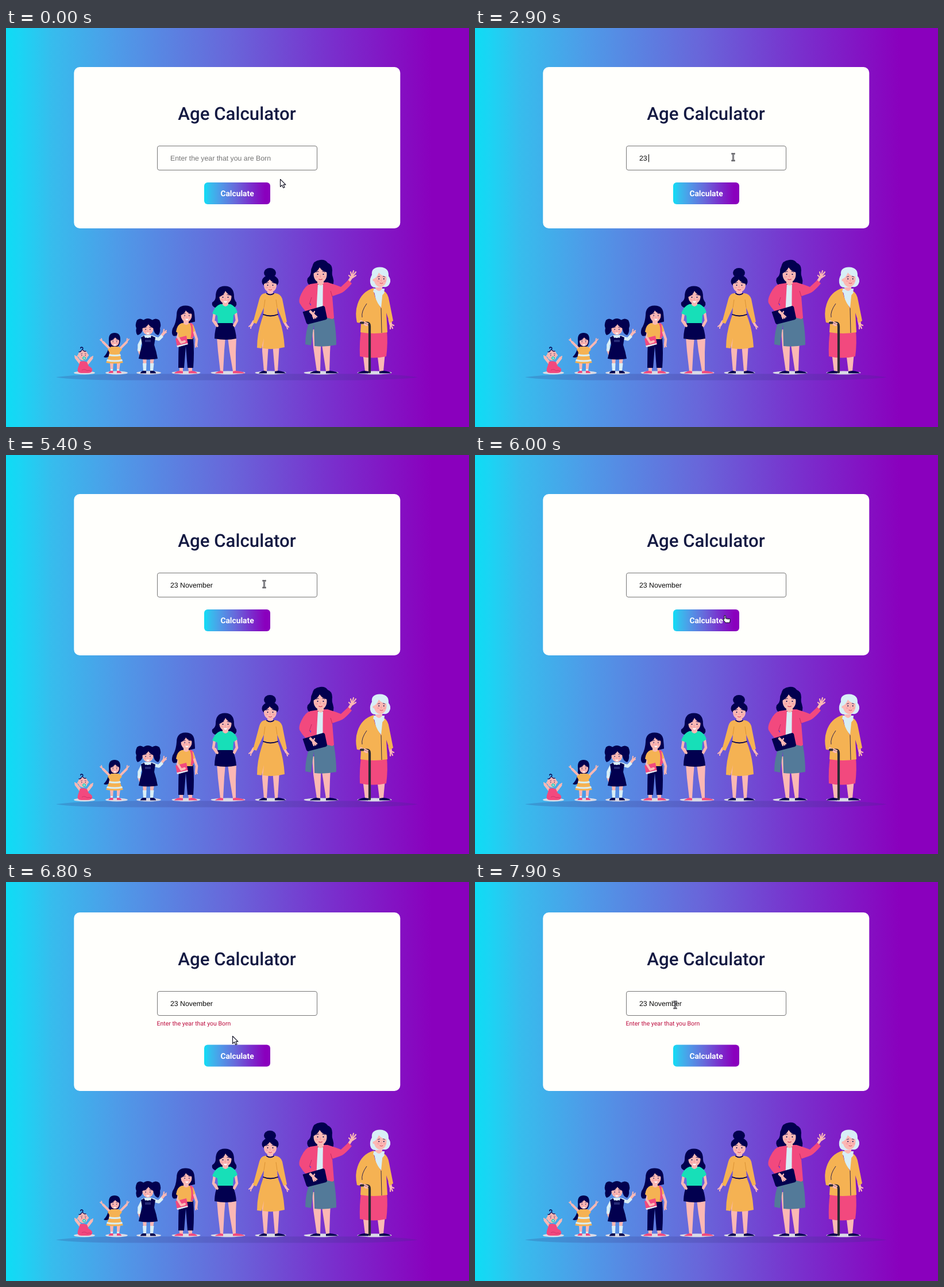
Recreate the animation shown at these times as an HTML page. Size 806 by 695 pixels, loop 8 s.

```html
<!DOCTYPE html>
<html lang="en">
<head>
<meta charset="utf-8">
<title>Age Calculator</title>
<style>
  html, body { margin: 0; width: 100%; height: 100%; overflow: hidden; }
  svg { display: block; width: 806px; height: 695px; }
  text { white-space: pre; text-rendering: geometricPrecision; }
  .ui { font-family: Roboto, sans-serif; }
  .field { font: 12.3px "Liberation Sans", Arial, sans-serif; }
  .navy { fill: #02004f; }
  .skin { fill: #fbb8b4; }
  .yellow { fill: #f5b253; }
  .pink { fill: #f2497e; }
  .pale { fill: #d8eef6; }
  .line { fill: none; stroke: #02004f; stroke-linecap: round; stroke-linejoin: round; }
  .limb { fill: none; stroke: #fbb8b4; stroke-linecap: round; stroke-linejoin: round; }
  .pad { fill: #dadbe6; }
</style>
</head>
<body>
<svg viewBox="0 0 806 695">
  <defs>
    <linearGradient id="sweep">
      <stop offset="0" stop-color="#0edcf4"/>
      <stop offset=".03" stop-color="#1ad5f4"/>
      <stop offset=".1" stop-color="#37bced"/>
      <stop offset=".24" stop-color="#4e9be8"/>
      <stop offset=".48" stop-color="#6867da"/>
      <stop offset=".7" stop-color="#7930cd"/>
      <stop offset=".92" stop-color="#8a00bd"/>
    </linearGradient>
    <g id="face">
      <ellipse cx="-6" cy="4" rx="2.3" ry="1.6" fill="#f5808f" opacity=".35"/>
      <ellipse cx="6" cy="4" rx="2.3" ry="1.6" fill="#f5808f" opacity=".35"/>
      <path class="line" stroke-width=".8" d="M-6.5-3.5q2-1.5 3.5-1M3-4.5q2-.5 3.500 1"/>
      <circle class="navy" cx="-4.5" r="1"/>
      <circle class="navy" cx="4.5" r="1"/>
      <path d="M0 1l-1 3h2" fill="none" stroke="#ee8f96" stroke-width=".8"/>
    </g>
    <g id="grin">
      <use href="#face"/>
      <path d="M-4 6q4 1 8 0q-1 4-4 4t-4-4z" fill="#fff" stroke="#e0798a" stroke-width=".4"/>
    </g>
    <g id="smile">
      <use href="#face"/>
      <path d="M-3 7.5q3 2 6 0" fill="none" stroke="#d8405e"/>
    </g>
  </defs>

  <rect width="806" height="695" fill="url(#sweep)"/>

  <g id="people">
    <path d="M87 608.5q30-5 110-6h410q80 .5 110 6q-30 4-110 5h-410q-80-.5-110-5z" fill="#35337f" opacity=".22"/>

    <!-- baby -->
    <g>
      <ellipse class="pad" cx="136.500" cy="600.500" rx="18.500" ry="3"/>
      <path class="limb" stroke-width="5" d="M122 574l7 9M149 575l-7 9"/>
      <path class="limb" stroke-width="2" d="M120 571l2 4M151 572l-2 4"/>
      <path class="pink" d="M129 581q7-2 12 1l3 7q7 3 6 8q-1 4-8 4h-11q-8 0-6-8z"/>
      <path d="M132 596q5-3 9 1q4-2 8 1" fill="none" stroke="#c92f66" stroke-width=".8"/>
      <ellipse class="skin" cx="134" cy="570" rx="8.500" ry="9"/>
      <circle class="skin" cx="126" cy="571" r="2"/>
      <circle class="skin" cx="142" cy="570" r="2"/>
      <path class="line" stroke-width="1.300" d="M132 561q4-4 0-5q-3 0-2 2M127 564q3 1 4-2M134 561q2 3 5 2"/>
      <use href="#face" transform="translate(135 570) scale(.7)"/>
      <circle cx="136" cy="575" r="2.800" fill="#19cdb9"/>
      <circle class="pale" cx="136" cy="575" r="1.200"/>
    </g>

    <!-- toddler -->
    <g>
      <ellipse class="pad" cx="192.500" cy="600.500" rx="19.500" ry="3"/>
      <path class="navy" d="M179 542q0-11 10-11t10 11q0 7-3 12l-8 3q-3 12-10 16q-5 2-8 0q6-6 8-14q2-9 1-17z"/>
      <path class="limb" stroke-width="4" d="M182 560l-13-13M197 560l13-13"/>
      <path class="limb" stroke-width="1.800" d="M169 547l-5-4M168 547l-2-6M210 547l4-5M210 547l1-6"/>
      <path class="skin" d="M181 582h6l-1 16h-4zM193 582h6l-2 16h-4z"/>
      <path class="yellow" d="M177 560l6-5h13l6 5-4 5q1 10 6 18q-15 3-30 0q5-9 6-18z"/>
      <path class="pale" d="M180 568q10 2 19 0l1 3q-11 2-21 0zM176 577q14 3 26 0l1 3q-14 3-28 0z"/>
      <ellipse class="skin" cx="189.500" cy="546" rx="7.500" ry="8.500"/>
      <path class="navy" d="M181 545q0-13 8-13t9 12q-5-1-8-5q-3 4-9 6z"/>
      <use href="#grin" transform="translate(189.500 546.500) scale(.7)"/>
      <path class="pale" d="M182 594h4v4h-4zM193 594h4v4h-4z"/>
      <path class="pink" d="M182 597h4.500v4h-8q0-2 3.500-4zM193 597h4q4 2 4 4h-8z"/>
    </g>

    <!-- schoolgirl -->
    <g>
      <ellipse class="pad" cx="248.500" cy="600.500" rx="21.500" ry="3"/>
      <path class="navy" d="M240 509q-7-5-12 0q-4 8-1 14q-2 7 2 12q6-1 9-9q3-8 2-17zM254 509q7-5 13 0q4 8 1 14q1 7-3 12q-6-1-8-9q-4-8-3-17z"/>
      <ellipse class="navy" cx="247" cy="518" rx="12" ry="12"/>
      <path class="limb" stroke-width="4.500" d="M231 560l4 11M271 536l4-5"/>
      <path class="limb" stroke-width="2" d="M274 532l5-5M274 531l1-6M275 532l4-2"/>
      <path d="M238 540l-6 12 0 11M258 540l8 2 6-6" fill="none" stroke="#d8eef6" stroke-width="5.500" stroke-linejoin="round"/>
      <path class="skin" d="M238 574h7l-1 13h-5zM251 574h7l-2 13h-5z"/>
      <path class="pale" d="M238 584h6.500l-.5 14h-5zM251 584h6.500l-1.500 14h-5z"/>
      <path class="pale" d="M236 537q11-5 24 0l-3 9h-18z"/>
      <path class="navy" d="M235 539l5-3q7 8 13 0l7 3-2 13q4 12 6 24q-16 3-33 0q2-12 6-24z"/>
      <path d="M242 543h10v4h-10z" fill="#262b78"/>
      <path class="pale" d="M241 535l6 3 6-3-1 5-5-2-5 2z"/>
      <ellipse class="skin" cx="247" cy="524.500" rx="9.500" ry="10"/>
      <path class="navy" d="M237 523q-1-16 10-16t10 16q-6-2-9-7q-4 6-11 7z"/>
      <use href="#grin" transform="translate(247 525) scale(.85)"/>
      <path class="navy" d="M239 597h5v4.500h-10q0-3 5-4.500zM251 597h5q5 1 5 4.500h-10z"/>
    </g>

    <!-- pupil with book -->
    <g>
      <ellipse class="pad" cx="313.500" cy="600.500" rx="25" ry="3"/>
      <path class="navy" d="M297 500q0-16 15-16.500t16 14q1 9 1 14l-16 4q-6 5-9 13q-3 9-12 8q-5-3-2-13q6-9 7-23.500z"/>
      <path class="pink" d="M320 514q6 0 7 5v18q-3 3-6 1z"/>
      <path class="limb" stroke-width="4.500" d="M326 524l6 18-1 10M301 530l-2 9"/>
      <path class="limb" stroke-width="2" d="M331 551l2 4M330 551l0 5"/>
      <path class="skin" d="M302 590h6v9h-6zM317 590h7v9h-6z"/>
      <path class="navy" d="M301 540h25q2 25 0 52h-10l-3-38-3 38h-10q0-26 1-52z"/>
      <path class="yellow" d="M306 514h14q8 2 9 14l-4 2v12h-25v-10l-4-3q2-13 10-15z"/>
      <path class="skin" d="M309 508h9v7q-4 4-9 0z"/>
      <path d="M321 514q5 7 2 27" fill="none" stroke="#f2497e" stroke-width="3"/>
      <path class="pink" d="M295 541l19-5 3 15-19 5z"/>
      <path class="pale" d="M297 553.500l19-4.500.5 2-18 5z"/>
      <path class="limb" stroke-width="4" d="M300 540l5 8 6-2"/>
      <ellipse class="skin" cx="314" cy="501" rx="9.500" ry="11"/>
      <path class="navy" d="M303 501q-1-16 10-16t11 13q-8-1-11-6q-2 6-10 9z"/>
      <use href="#grin" transform="translate(315 501) scale(.85)"/>
      <path class="pink" d="M302 597l6 1v3.500h-15q1-3 9-4.500zM318 598l6-1q8 1 9 4.500h-15z"/>
    </g>

    <!-- teenager -->
    <g>
      <ellipse class="pad" cx="386.500" cy="600.500" rx="30" ry="3"/>
      <path class="navy" d="M365 468q0-18.500 16-18.500t16 18.500q0 5 4 10q2 8-8 10h-25q-11-2-9-10q6-4 6-10z"/>
      <path class="limb" stroke-width="4.500" d="M363 497l-2 13 7 10M400 497l2 13-5 9"/>
      <path class="skin" d="M367 538h15l-2 23-2 37h-5l-4-35zM386 538h15l-1 27 0 33h-5l-6-35z"/>
      <path class="skin" d="M370 508h24v8h-24z"/>
      <path class="navy" d="M369 513h25q6 13 7 28q-18 4-38 0q0-16 6-28z"/>
      <path d="M373 481h18q9 4 12 14l-7 5-1 14h-26l-1-13-9-4q5-13 14-16z" fill="#17dfb8"/>
      <path class="skin" d="M377 474h10v8q-5 6-10 0z"/>
      <path class="limb" stroke-width="4" d="M368 519l-4-7M397 518l4-7"/>
      <ellipse class="skin" cx="382" cy="468" rx="10.500" ry="12.500"/>
      <path class="navy" d="M370 469q-2-19 12-19t12 17q-8-2-12-9q-3 8-12 11z"/>
      <use href="#grin" transform="translate(382 469)"/>
      <path class="pink" d="M373 597l5 1v3.500h-14q1-2 9-4.500zM395 598l5-1q13 1 16 4.500h-21z"/>
    </g>

    <!-- woman in a dress -->
    <g>
      <ellipse class="pad" cx="460.500" cy="600.500" rx="27" ry="3"/>
      <ellipse class="navy" cx="459.500" cy="426.500" rx="10.500" ry="8.500"/>
      <ellipse class="navy" cx="460" cy="441.500" rx="14.500" ry="11"/>
      <path class="limb" stroke-width="4" d="M431 511l-4 7M484 511l4 7"/>
      <path class="limb" stroke-width="2" d="M428 516l-5 4M427 517l-1 6M488 517l4 4M488 517l2 7"/>
      <path class="skin" d="M446 540h12l-2 26-2 32h-5l-3-35zM464 550h12l-3 48h-5z"/>
      <path class="yellow" d="M451 462h18q9 1 12 10l8 40-6 2-11-27 1 13q10 23 12 56q-19 5-38 2l2-18-4 18-8-1q0-28 11-57l1-13-13 28-6-2 11-41q3-10 10-10z"/>
      <path d="M449 487l2-14M472 487l-2-14" fill="none" stroke="#d88f32" stroke-width=".9"/>
      <path class="line" stroke-width="1.800" d="M448 499q12 5 25 0"/>
      <path class="skin" d="M455 455h10v9q-5 4-10 0z"/>
      <path class="line" stroke-width="1.800" d="M454 462.500q6 4 12 0"/>
      <ellipse class="skin" cx="460" cy="448" rx="11" ry="12.500"/>
      <path class="navy" d="M447 446q-1-15 13-15t13 15q-8-1-14-8q-5 7-12 8z"/>
      <use href="#smile" transform="translate(460 448)"/>
      <path class="navy" d="M449 597l5 1v3.500h-14q2-3 9-4.500zM468 598l6-1q11 1 13 4.500h-19z"/>
    </g>

    <!-- office worker -->
    <g>
      <ellipse class="pad" cx="548.500" cy="600.500" rx="30" ry="3"/>
      <path class="navy" d="M533 416q2-11 14-12q9-1 13 5q8 3 8 13q-1 7 1 12q4 12-4 18q-20 2-34-2q-9-6-6-14q6-5 6-12q0-5 2-8z"/>
      <path class="limb" stroke-width="4.500" d="M597 441l6-9"/>
      <path class="limb" stroke-width="2.200" d="M602 434l7-9M602 433l3-10M602 433l-2-8M603 435l6-4M601 435l-4-4"/>
      <path class="skin" d="M533 525h17l-2 32-1 41h-6l-6-42zM549 545h16l-1 20-1 33h-6l-5-33z"/>
      <path d="M531 501h39q5 25 5 51q-20 4-38 2l-1-38-5 37-10-2q0-25 10-48z" fill="#537a99"/>
      <path class="pale" d="M540 447h16v52h-17z"/>
      <path class="pink" d="M543 444q-2 32-3 62l-10-1 1-25-3 0 10 15-6 7q-13-9-21-23q-2-6 3-16q7-15 16-17zM552 443q-1 36 0 60l16 4 3-2-3-38q7-2 17-6q7-4 17-16l-6-6-13 12q-13-5-23-8z"/>
      <path d="M528 481l4-12M568 468l-3-10" fill="none" stroke="#bd285f" stroke-width=".9"/>
      <path class="skin" d="M542 436h11v9q-5 7-11 0z"/>
      <path class="navy" d="M518 494l34-10q2 0 3 2l4 19q0 2-2 3l-31 8q-2 0-3-2l-6-18q-1-2 1-2z"/>
      <path class="limb" stroke-width="4.500" d="M530 494l6 6"/>
      <path class="limb" stroke-width="2.400" d="M536 499l5 4M535 500l4 5M534 501l2 5M535 498l2-4"/>
      <ellipse class="skin" cx="547" cy="429" rx="11.500" ry="14.500"/>
      <path class="navy" d="M534 428q-2-20 12-20t15 18q-10-1-15-9q-4 8-12 11z"/>
      <use href="#smile" transform="translate(547.500 429) scale(1.100)"/>
      <path class="navy" d="M540 597l7 1v3.500h-18q2-3 11-4.500zM557 598l7-1q12 1 14 4.500h-21z"/>
    </g>

    <!-- grandmother -->
    <g>
      <ellipse class="pad" cx="641.500" cy="600.500" rx="30" ry="3"/>
      <path class="limb" stroke-width="5" d="M668 508l2 9"/>
      <path class="limb" stroke-width="2.200" d="M670 516l5 2M670 517l3 6M669 517l0 7"/>
      <path class="skin" d="M621 565h13l-3 33h-6zM646 565h14l-3 33h-7z"/>
      <path class="pink" d="M618 527h45q2 22-1 45q-23 5-46 0q-1-23 2-45z"/>
      <path class="pale" d="M640 454h19l-4 35-10-10z"/>
      <path class="yellow" d="M640 453q0 18 13 35l3-31q9 4 11 18l7 35-6 4-6-18 2 34q-24 4-47 0l1-16-7-1q-4-18 1-32q7-22 28-28z"/>
      <path d="M620 504q-2-10 8-24M653 488l1 43" fill="none" stroke="#02004f" stroke-width=".8"/>
      <path class="skin" d="M643 444h12v10q-5 8-12 0z"/>
      <path class="pale" d="M641 453l8 7 7-6 3 7-8 9-12-11z"/>
      <path class="limb" stroke-width="4.500" d="M618 511l9 6"/>
      <path d="M618 513.500h10q5 0 5 6v80" fill="none" stroke="#2b2a35" stroke-width="4.200" stroke-linecap="round"/>
      <path class="limb" stroke-width="2.200" d="M624 512l6 3M624 515l5 3"/>
      <path class="pale" d="M637 430q-2-13 14-13.500q16 .5 15 15.500q5 6 2 13q-3 7-10 6l-14 1q-8 1-10-8q-1-8 3-14z"/>
      <ellipse class="skin" cx="651.500" cy="437" rx="11" ry="14"/>
      <path class="pale" d="M638 438q-2-18 12-18q14 0 14 13q-10 0-15-7q-3 9-11 12z"/>
      <circle class="skin" cx="640.500" cy="439" r="2.200"/>
      <use href="#smile" transform="translate(653.500 437) scale(.95)"/>
      <path class="navy" d="M624 597l7 1v3.500h-19q2-3 12-4.500zM650 598l7-1q12 1 13 4.500h-20z"/>
    </g>
  </g>

  <rect id="card" x="118.300" y="68" width="568" height="281" rx="10" fill="#fffffc"/>
  <g id="form">
    <text class="ui" x="402" y="160" font-size="31.200" font-weight="500" text-anchor="middle" fill="#141a42">Age Calculator</text>
    <rect x="263.500" y="205.500" width="278" height="42" rx="3.500" fill="#fffffd" stroke="#767676"/>
    <text class="field" id="hint" x="286" y="231" fill="#757575">Enter the year that you are Born</text>
    <text class="field" id="entry" x="286" y="231" fill="#0a0a0a"></text>
    <rect id="caret" y="220" width="1" height="13.500" fill="#000"/>
    <text class="ui" id="error" x="262.500" y="265" font-size="10.500" fill="#bd0d3f">Enter the year that you Born</text>
  </g>
  <g id="button">
    <rect x="345" y="269" width="115" height="38" rx="6" fill="url(#sweep)"/>
    <text class="ui" x="402.500" y="293" font-size="13.800" font-weight="700" text-anchor="middle" fill="#fff">Calculate</text>
  </g>

  <g id="pointer" stroke-linejoin="round">
    <path id="arrow" d="M.5.5v13l3-2.800 2.300 4.800 2.300-1-2.200-4.600h4z" fill="#fff" stroke="#111122" stroke-width="1.100"/>
    <g id="beam" fill="none">
      <path d="M-3-6h2l1 1 1-1h2M-3 6h2l1-1 1 1h2M0-5v10" stroke="#15151d" stroke-width="2.400"/>
      <path d="M-2.500-6h1.500l1 1 1-1h1.500M-2.500 6h1.500l1-1 1 1h1.500M0-5v10" stroke="#e4e4e4" stroke-width=".8"/>
    </g>
    <g id="hand" stroke="#111122" stroke-width="1.100">
      <path d="M-1 .8q1.500-1 2.200.7v4l7 1q1.300.3 1 2l-.7 4.500h-7.500l-4-5q0-2 2-1z" fill="#fff"/>
      <path d="M3.500 5.500v2M5.800 6v2" fill="none" stroke-width=".8"/>
    </g>
  </g>
</svg>

<script>
  const LOOP = 8000, ERROR_AT = 6100, ENTRY = '23 November';

  // [start ms, value...], held until the next entry
  const moves = [
    [0, 'arrow', 477, 263], [500, 'arrow', 466, 253], [600, 'arrow', 456.5, 243.5],
    [800, 'beam', 452, 234], [900, 'beam', 449.5, 225],
    [5600, 'arrow', 441, 243.5], [5800, 'hand', 435, 276], [6000, 'hand', 435, 279],
    [6100, 'arrow', 434.5, 279],
    [6800, 'arrow', 394, 268], [6900, 'arrow', 388, 277], [7000, 'hand', 382, 290],
    [7100, 'hand', 374, 294], [7200, 'hand', 366, 287], [7300, 'arrow', 358, 272],
    [7400, 'arrow', 351, 258], [7500, 'arrow', 355, 244], [7600, 'arrow', 364, 236],
    [7700, 'beam', 357, 226], [7800, 'beam', 351, 218], [7900, 'beam', 348.5, 214]
  ];
  const typing = [
    [0, 0], [2300, 1], [2400, 2], [2900, 3], [3200, 4], [3500, 5],
    [3600, 6], [3800, 7], [3900, 8], [4300, 9], [4600, 11]
  ];
  const blinks = [
    [0, false], [1100, true], [1600, false], [2300, true],
    [5400, false], [5800, true], [6000, false]
  ];

  const el = id => document.getElementById(id);
  const at = (list, t) => list.findLast(step => step[0] <= t).slice(1);
  const show = (id, on) => el(id).setAttribute('visibility', on ? 'visible' : 'hidden');
  const shift = (id, x, y) => el(id).setAttribute('transform', `translate(${x} ${y})`);

  function draw(t) {
    const [shape, x, y] = at(moves, t);
    const [count] = at(typing, t);
    const [blink] = at(blinks, t);
    const failed = t >= ERROR_AT;
    const grow = failed ? 15 : 0;

    for (const id of ['arrow', 'beam', 'hand']) show(id, id === shape);
    shift('pointer', x, y);

    const entry = el('entry');
    entry.textContent = ENTRY.slice(0, count);
    show('hint', count === 0);
    show('caret', blink);
    const width = count ? entry.getComputedTextLength() : 0;
    el('caret').setAttribute('x', Math.floor(285.6 + width));

    el('card').setAttribute('y', 68 - grow);
    el('card').setAttribute('height', 281 + 2 * grow);
    shift('form', 0, -grow);
    shift('button', 0, failed ? 14.5 : 0);
    shift('people', 0, grow);
    show('error', failed);
  }

  function tick() {
    draw(performance.now() % LOOP);
    requestAnimationFrame(tick);
  }
  tick();
</script>
</body>
</html>
```
